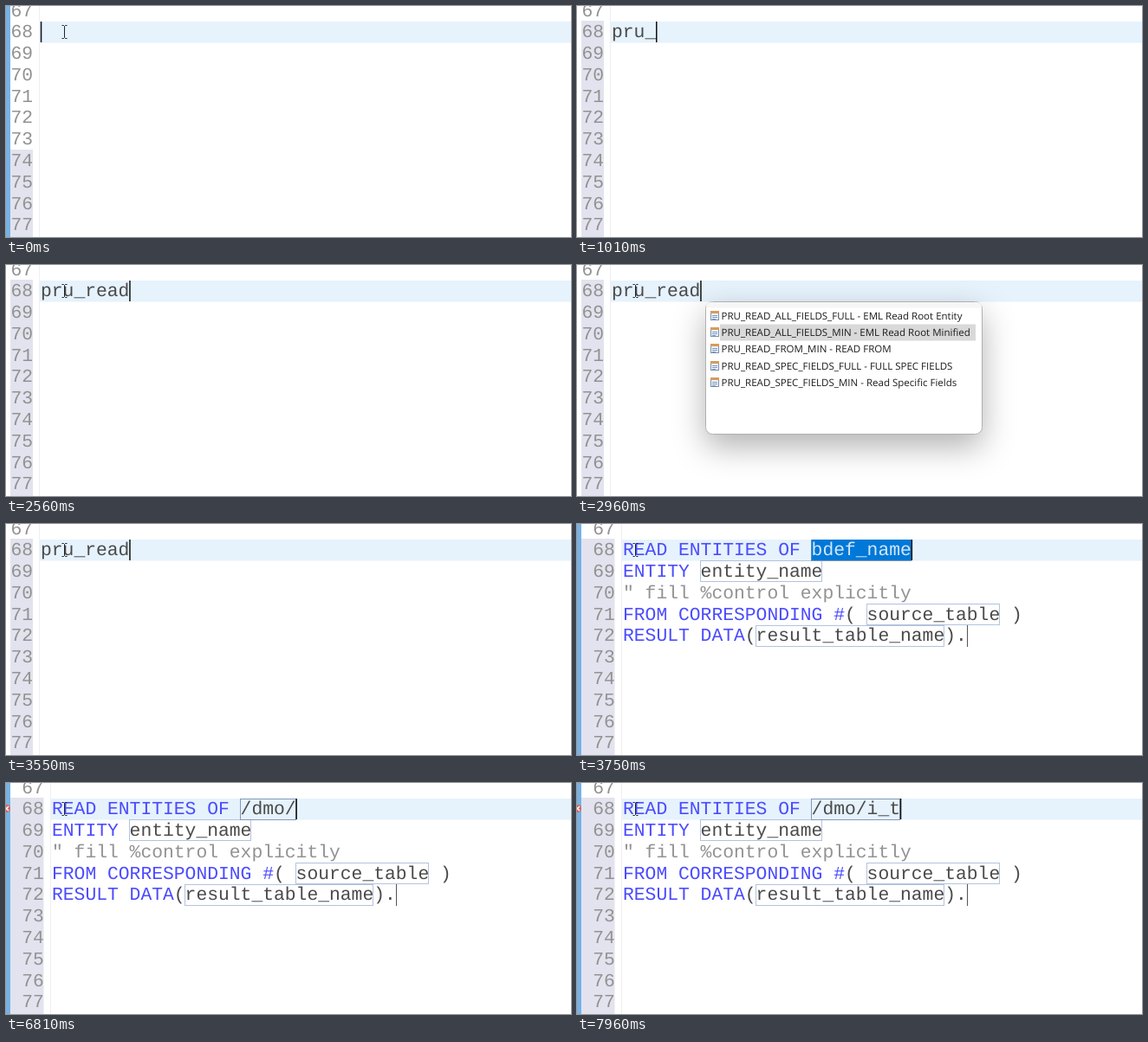
Write an HTML page that moves like this. It is 652 px wide and 267 px high and loops after 8000 ms.

```html
<!DOCTYPE html>
<html lang="en">
<head>
<meta charset="utf-8">
<title>Code template completion</title>
<style>
  html, body { margin: 0; width: 100%; height: 100%; overflow: hidden; background: #fff; }
  svg { display: block; }
  text { white-space: pre; text-rendering: geometricPrecision; }
  .code { font: 21.333px "Liberation Mono", monospace; fill: #4a4a4a; }
  .num { fill: #929292; }
  .key { fill: #4b4bff; }
  .note { fill: #929292; }
  .sel { fill: #d3e7f8; }
  .field { fill: none; stroke: #b3c3de; }
  .item { font: 11.52px "Open Sans", sans-serif; fill: #1c1c1c; }
  #popup { filter: drop-shadow(0 14px 18px rgba(0, 0, 0, .3)); }
</style>
</head>
<body>
<svg id="stage" width="652" height="267" viewBox="0 0 652 267"></svg>
<script>
const LOOP = 8000, CHAR = 12.8, LINE = 24.78, TOP = 17.5, BASE = 36.3;
const POPUP_OPEN = 2630, POPUP_CLOSE = 3550, INSERT = 3620, GUTTER_DIRTY = 340;

// time, typed text, mouse beam visible, caret hidden
const steps = [
  [0, "", 1], [70, "p", 0], [210, "p", 1], [340, "pr", 0], [480, "pru", 0], [680, "pru", 1],
  [1010, "pru_", 0], [1210, "pru_r", 0], [1280, "pru_r", 1], [1350, "pru_re", 0], [1420, "pru_re", 1],
  [1680, "pru_rea", 0], [1890, "pru_read", 0], [2160, "pru_read", 1],
  [INSERT, "bdef_name", 1], [4560, "/", 0], [5160, "/", 0, 1], [5290, "/", 1, 1],
  [5560, "/d", 0], [5820, "/dm", 0], [5960, "/dm", 1], [6080, "/dmo", 0], [6280, "/dmo", 1],
  [6680, "/dmo/", 0], [6810, "/dmo/", 1], [7070, "/dmo/i", 0], [7210, "/dmo/i", 1],
  [7620, "/dmo/i_", 0], [7890, "/dmo/i_t", 0], [7960, "/dmo/i_t", 1]
];
const choices = [
  "PRU_READ_ALL_FIELDS_FULL - EML Read Root Entity",
  "PRU_READ_ALL_FIELDS_MIN - EML Read Root Minified",
  "PRU_READ_FROM_MIN - READ FROM",
  "PRU_READ_SPEC_FIELDS_FULL - FULL SPEC FIELDS",
  "PRU_READ_SPEC_FIELDS_MIN - Read Specific Fields"
];

const stage = document.getElementById("stage");
function add(parent, tag, attrs = {}, text = "") {
  const el = document.createElementNS("http://www.w3.org/2000/svg", tag);
  set(el, attrs);
  el.textContent = text;
  return parent.appendChild(el);
}
function set(el, attrs) {
  for (const k in attrs) el.setAttribute(k, attrs[k]);
}
const show = (el, on) => el.setAttribute("visibility", on ? "visible" : "hidden");
const rect = (parent, x, y, width, height, fill, more) =>
  add(parent, "rect", { x, y, width, height, fill, ...more });
const write = (parent, x, row, text, kind = "") =>
  add(parent, "text", { x, y: BASE + row * LINE, class: "code " + kind }, text);

// Editor background and gutter
const current = rect(stage, 39, 18, 613, 24.5, "#e6f2fc");
const rail = rect(stage, 0, 0, 5, 267, "#78b2e4");
const gutter = rect(stage, 5, 166, 26, 101, "#e3e3ef");
const edge = rect(stage, 38, 0, 1, 267, "#f0f0f2");
const numbers = add(stage, "g");
for (let i = -1; i < 10; i++) write(numbers, 5.4, i, 68 + i, "num");
const error = add(stage, "g");
add(error, "circle", { cx: 0.5, cy: 29.5, r: 4.5, fill: "#d9655f" });
add(error, "path", { d: "M-2 27l5 5m0-5l-5 5", stroke: "#fff", "stroke-width": 1.3 });

// Inserted template
const snippet = add(stage, "g");
const LEFT = 53;
const col = n => LEFT + n * CHAR;
const fieldWidth = length => Math.floor(length * CHAR);
function field(row, start, length) {
  return add(snippet, "rect", {
    class: "field", x: Math.round(col(start)) - .5, y: Math.round(TOP + row * LINE) + .5,
    width: fieldWidth(length), height: 24
  });
}
write(snippet, LEFT, 0, "READ ENTITIES OF", "key");
write(snippet, LEFT, 1, "ENTITY", "key");
write(snippet, LEFT, 2, "\" fill %control explicitly", "note");
write(snippet, LEFT, 3, "FROM CORRESPONDING #", "key");
write(snippet, LEFT, 4, "RESULT DATA", "key");
[[1, 7, "entity_name"], [3, 22, "source_table"], [4, 12, "result_table_name"]].forEach(([row, c, name]) => {
  field(row, c, name.length);
  write(snippet, col(c), row, name);
});
write(snippet, col(20), 3, "(");
write(snippet, col(35), 3, ")");
write(snippet, col(11), 4, "(");
write(snippet, col(29), 4, ").");
rect(snippet, 450, 117, 1, 25, "#555");
const box = field(0, 17, 9);
box.style.stroke = "#8098b8";
const mark = rect(snippet, col(17), 18, 9 * CHAR, 24, "#0078d7");

const typed = write(stage, 40, 0, "");
const caret = rect(stage, 40, 18, 1.5, 24, "#111");
const beam = add(stage, "path", {
  d: "M64.5 22.5h2l1 1l1-1h2M67.5 23.5v13M64.5 37.5h2l1-1l1 1h2",
  fill: "none", stroke: "#222"
});

// Completion list
const popup = add(stage, "g", { id: "popup" });
rect(popup, 148.5, 42.5, 319, 153, "#fff", { rx: 8, stroke: "#b0b0b0" });
add(popup, "path", { d: "M149 49.5V48a6 5 0 0 1 6-5H461a6 5 0 0 1 6 5v1.5z", fill: "#f6f6f6" });
const pick = rect(popup, 165, 0, 295, 19, "#d9d9d9");
choices.forEach((label, i) => {
  const y = 59 + i * 19.2;
  rect(popup, 154.5, Math.round(y) - 5.5, 9, 10, "#edf3fa", { stroke: "#7890ac" });
  rect(popup, 154, Math.round(y) - 6, 10, 3, "#d99a5b");
  add(popup, "path", { d: `M156 ${Math.round(y) - .5}h6m-6 2h6m-6 2h4`, stroke: "#7c9cc4" });
  add(popup, "text", { x: 166.5, y: y + 4, class: "item" }, label);
});

function draw(t) {
  const [, text, beamOn, caretOff] = steps.findLast(s => s[0] <= t);
  const inserted = t >= INSERT, selected = text === "bdef_name";
  const dirty = t >= GUTTER_DIRTY;
  const x = inserted ? col(17) : 40;
  const edgeX = inserted ? 51 : 38;

  show(rail, !dirty || inserted);
  set(gutter, { y: dirty ? 17 : 166, height: dirty ? 250 : 101, width: inserted ? 38.5 : 26 });
  set(edge, { x: edgeX });
  set(current, { x: edgeX + 1 });
  set(numbers, { transform: `translate(${inserted ? CHAR : 0} 0)` });
  show(error, t >= 4760);
  show(snippet, inserted);
  show(mark, selected);
  set(box, { width: fieldWidth(text.length) });

  typed.textContent = text;
  set(typed, { x, class: "code" + (selected ? " sel" : "") });
  set(caret, { x: x + text.length * CHAR - .2 });
  show(caret, !caretOff);
  show(beam, beamOn);

  show(popup, t >= POPUP_OPEN && t < POPUP_CLOSE);
  const choice = t < 2960 ? 0 : t < 3220 ? 1 : 2;
  set(pick, { y: 49.3 + choice * 19.2 });
}

const start = performance.now();
function tick(now) {
  draw(Math.max(0, now - start) % LOOP);
  requestAnimationFrame(tick);
}
draw(0);
requestAnimationFrame(tick);
</script>
</body>
</html>
```
